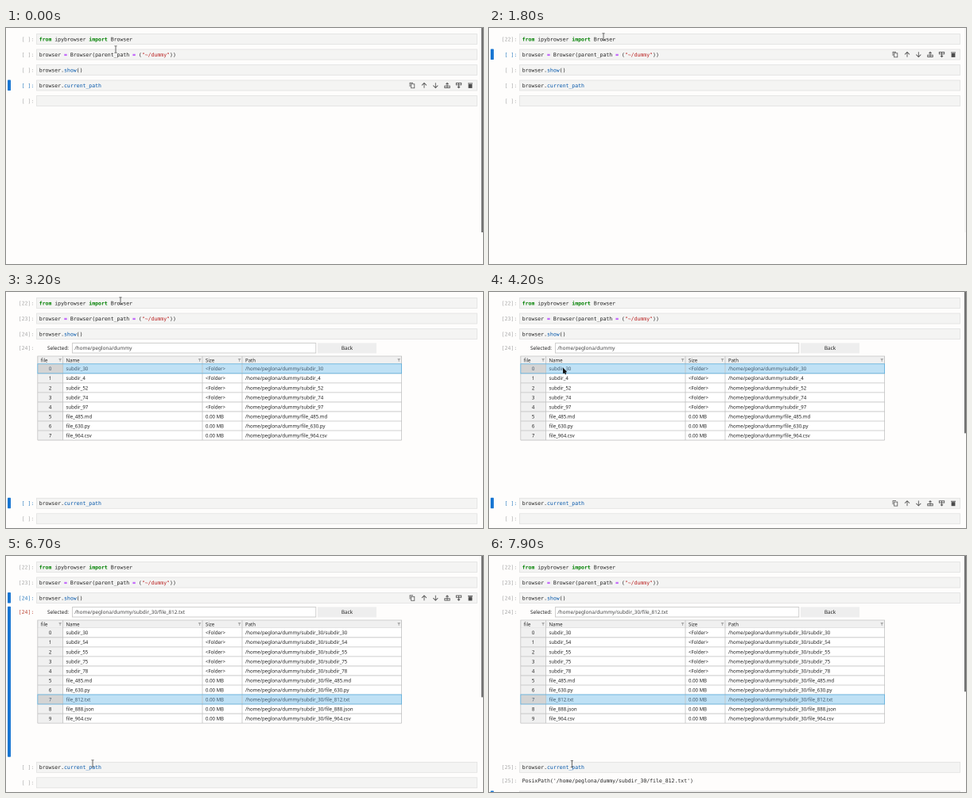
An HTML page with a canvas for the animation above (8000 ms loop, 600x298 px).

```html
<!DOCTYPE html>
<html lang="en">
<head>
<meta charset="utf-8">
<title>Notebook file browser</title>
<style>
  html, body { margin: 0; width: 100%; height: 100%; overflow: hidden; background: #fefdfc; }
  canvas { display: block; width: 600px; height: 298px; }
</style>
</head>
<body>
<canvas id="stage"></canvas>
<script>
const W = 600, H = 298, LOOP = 8000, STEP = 100;
const canvas = document.getElementById('stage');
const ctx = canvas.getContext('2d');
// Double resolution keeps the small text smooth.
const scale = 2 * (window.devicePixelRatio || 1);
canvas.width = W * scale;
canvas.height = H * scale;

const CODE_SIZE = 6.5, CHAR = CODE_SIZE * 0.602;
const MONO = { size: CODE_SIZE, family: '"DejaVu Sans Mono", monospace' };
const LABEL = { size: 6.4, family: '"Noto Sans", sans-serif' };
const SMALL = { ...LABEL, size: 6.05 };
const INK = '#212121', BLUE = '#0055aa', GREEN = '#008000', ACCENT = '#1976d2', FADED = '#a9a9a9';
const HOME = '/home/peglona/dummy', SUBDIR = `${HOME}/subdir_30`, PICK = `${SUBDIR}/file_812.txt`;

const CODE = [
  [['from', GREEN, 1], [' ipybrowser '], ['import', GREEN, 1], [' Browser']],
  [['browser '], ['=', '#aa22ff', 1], [' Browser(parent_path '], ['=', '#aa22ff', 1],
   [' ('], ['"~/dummy"', '#ba2121'], ['))']],
  [['browser.'], ['show', BLUE], ['()']],
  [['browser.'], ['current_path', BLUE]],
  []
];
const ROOT_FILES = ['subdir_30', 'subdir_4', 'subdir_52', 'subdir_74', 'subdir_97',
  'file_485.md', 'file_630.py', 'file_964.csv'];
const SUB_FILES = ['subdir_30', 'subdir_54', 'subdir_55', 'subdir_75', 'subdir_78',
  'file_485.md', 'file_630.py', 'file_812.txt', 'file_888.json', 'file_964.csv'];

// Running cell i selects the cell below it.
const RUNS = [{ at: 1500, done: 1700 }, { at: 2300, done: 2500 },
  { at: 3000, done: 3200 }, { at: 7800, done: 7900 }];
const SHOWN = RUNS[2].done, PRINTED = RUNS[3].done;
const OPEN_DIR = 4600, PICK_FILE = 6000;
const EVENTS = [
  { at: -STEP, cell: 3, wait: 0 },
  { at: 500, cell: 0, wait: 100, edit: true },
  { at: OPEN_DIR, cell: 2, wait: 100 },
  { at: 7100, cell: 3, wait: 100, edit: true },
  ...RUNS.map(({ at }, i) => ({ at, cell: i + 1, wait: 200 + (i === 2) * 200 }))
].sort((a, b) => a.at - b.at);

const MOVES = [
  { from: 0, to: 300, x: 144, y: 11 },
  { from: 3800, to: 4200, x: 93, y: 95.5 },
  { from: 4900, to: 5400, x: 112, y: 117 },
  { from: 5400, to: 5800, x: 112, y: 180.5 },
  { from: 6200, to: 6700, x: 109, y: 262 },
  { from: 6700, to: 7100, x: 104.3, y: 262.5 }
];

const clamp = v => Math.min(1, Math.max(0, v));

function pointerAt(t) {
  let x = 138, y = 27;
  for (const m of MOVES) {
    const k = clamp((t - m.from) / (m.to - m.from));
    x += (m.x - x) * k;
    y += (m.y - y) * k;
  }
  return [x, y];
}

function rowY(i, t) {
  let y = 14 + 19.5 * i;
  if (i > 2 && t >= SHOWN) y += 194.3;
  if (i > 3 && t >= PRINTED) y += 17.2;
  return y;
}

function promptOf(i, t) {
  const run = RUNS[i];
  if (!run || t < run.at) return '[ ]:';
  return t < run.done ? '[*]:' : `[${22 + i}]:`;
}

function text(str, x, y, { size, family, color = INK, bold, align = 'left' } = MONO) {
  ctx.font = `${bold ? 'bold ' : ''}${size}px ${family}`;
  ctx.fillStyle = color;
  ctx.textAlign = align;
  ctx.fillText(str, x, y + 2.3);
}

function prompt(str, y, color) {
  text(str, 35.3, y, { ...MONO, color, align: 'right' });
}

function box(x, y, w, h, fill, stroke, width = 0.7) {
  ctx.fillStyle = fill;
  ctx.fillRect(x, y, w, h);
  if (stroke) outline(x, y, w, h, stroke, width);
}

function outline(x, y, w, h, color, width) {
  ctx.strokeStyle = color;
  ctx.lineWidth = width;
  ctx.strokeRect(x, y, w, h);
}

function line(color, width, x, y, ...rest) {
  ctx.strokeStyle = color;
  ctx.lineWidth = width;
  ctx.beginPath();
  ctx.moveTo(x, y);
  for (let i = 0; i < rest.length; i += 2) ctx.lineTo(rest[i], rest[i + 1]);
  ctx.stroke();
}

function marker(y, h) {
  ctx.fillStyle = ACCENT;
  ctx.beginPath();
  ctx.roundRect(2, y, 4, h, 0.8);
  ctx.fill();
}

function cell(i, t, event) {
  const y = rowY(i, t), active = event.cell === i, editing = active && event.edit;
  if (active) marker(y - 7, 13.5);
  prompt(promptOf(i, t), y, active ? '#307fc1' : FADED);
  box(38.5, y - 6.5, 554, 13, editing ? '#fff' : '#f4f4f3', editing ? ACCENT : '#dedede');
  let x = 41.7;
  for (const [str, color, bold] of CODE[i]) {
    text(str, x, y, { ...MONO, color, bold });
    x += str.length * CHAR;
  }
  const blink = editing && t - event.at < 500;
  if (blink) {
    const caretX = 41.7 + CHAR * (i ? 17 : 26);
    line(INK, 0.7, caretX, y - 5.5, caretX, y + 5.5);
  }
}

// dir is -1 for up, 1 for down
function arrow(x, y, dir, size) {
  line('#555', 0.9, x, y - dir * 3.3, x, y + dir * 3);
  line('#555', 0.9, x - size, y + dir * (3.1 - size), x, y + dir * 3.1, x + size, y + dir * (3.1 - size));
}

function insertIcon(x, y, dir) {
  arrow(x, y, dir, 1.6);
  outline(x - 3.2, y - dir * 0.7, 6.4, -dir * 2.3, '#555', 0.9);
}

function toolbar(y) {
  line('#555', 0.8, 508, y + 1.5, 508, y - 3.2, 512, y - 3.2);
  outline(509.6, y - 1.7, 4.2, 5, '#555', 0.8);
  arrow(526, y, -1, 3);
  arrow(540.3, y, 1, 3);
  insertIcon(555, y, -1);
  insertIcon(569.5, y, 1);
  box(581.6, y - 1.6, 4.8, 5, '#4c4c4c');
  box(581, y - 3, 6, 0.9, '#4c4c4c');
}

function funnel(x) {
  ctx.fillStyle = FADED;
  ctx.beginPath();
  ctx.moveTo(x - 1.9, 84);
  ctx.lineTo(x + 1.9, 84);
  ctx.lineTo(x, 87);
  ctx.fill();
  line(FADED, 0.9, x, 86, x, 88);
}

function table(dir, files, picked) {
  const cols = [39.8, 71.5, 247, 297, 497.6], rowH = 12.03, top = 90.8;
  const left = cols[0], width = cols[4] - left, indexW = cols[1] - left;
  const height = rowH * files.length, border = '#c2c2c2';
  box(left, 81, width, top - 81, '#f0f0f0', border);
  box(left, top, width, height, '#fff');
  box(left, top, indexW, height, '#f0f0f0');
  ['file', 'Name', 'Size', 'Path'].forEach((label, i) => {
    text(label, cols[i] + 4, 86, SMALL);
    funnel(cols[i + 1] - 3.4);
  });
  files.forEach((name, i) => {
    const y = top + rowH * i, mid = y + 6.1, on = i === picked;
    const style = { ...SMALL, color: on ? '#40566a' : INK };
    if (on) {
      box(left, y, width, rowH, '#bfe1f5');
      box(left, y, indexW, rowH, '#d4d4d4');
    }
    line(border, 0.8, left, y + rowH, cols[4], y + rowH);
    text(String(i), 55.6, mid, { ...style, align: 'center' });
    [name, name.startsWith('subdir') ? '<Folder>' : '0.00 MB', `${dir}/${name}`]
      .forEach((str, c) => text(str, cols[c + 1] + 4, mid, style));
  });
  for (const x of cols) line(border, 0.8, x, 81, x, top + height);
  if (picked >= 0) outline(left, top + rowH * picked, width, rowH, '#5aaede', 0.8);
}

function browser(t, active) {
  const inSub = t >= OPEN_DIR, dir = inSub ? SUBDIR : HOME;
  if (active) marker(63.7, 190);
  prompt('[24]:', 70.5, active ? '#bf4a3a' : FADED);
  text('Selected:', 52, 70.9, LABEL);
  box(83.4, 64.6, 306.4, 12.4, '#fff', '#bdbdbd', 0.7);
  text(t >= PICK_FILE + STEP ? PICK : dir, 86.3, 70.9, { ...LABEL, color: '#444' });
  box(392, 64.4, 74, 13, '#eee');
  text('Back', 429, 70.9, { ...LABEL, align: 'center' });
  if (inSub) table(dir, SUB_FILES, t >= PICK_FILE ? 7 : -1);
  else table(dir, ROOT_FILES, 0);
}

function scrollbar(t) {
  const shift = rowY(4, t) - rowY(4, 0);
  ctx.globalAlpha = t < SHOWN ? Math.max(0.05, clamp((1800 - t) / 400)) : clamp((t - SHOWN) / 300);
  box(598.2, 0, 1.5, 258 - 0.41 * shift, '#404040');
  ctx.globalAlpha = 1;
}

function pointer(t) {
  const [x, y] = pointerAt(t);
  if (y > 60 && y < 257) {
    line('#111', 1.3, x + 1.6, y + 4, x + 3.5, y + 8.5);
    ctx.fillStyle = '#111';
    ctx.beginPath();
    ctx.moveTo(x, y);
    ctx.lineTo(x, y + 7.5);
    ctx.lineTo(x + 5.2, y + 5.5);
    ctx.fill();
    return;
  }
  line('#444', 0.8, x, y - 4, x, y + 4);
  for (const end of [-4.2, 4.2]) line('#444', 0.7, x - 1.6, y + end, x + 1.6, y + end);
}

function draw(t) {
  const event = EVENTS.filter(e => e.at <= t).pop();
  ctx.setTransform(scale, 0, 0, scale, 0, 0);
  box(0, 0, W, H, '#fefdfc');
  CODE.forEach((_, i) => cell(i, t, event));
  if (t >= SHOWN) browser(t, event.cell === 2);
  if (t >= PRINTED) {
    prompt('[25]:', 283.5, FADED);
    text(`PosixPath('${PICK}')`, 41.7, 283.5);
  }
  if (t >= event.at + event.wait) toolbar(rowY(event.cell, t));
  scrollbar(t);
  pointer(t);
}

const start = performance.now();
function tick() {
  const t = (performance.now() - start) % LOOP;
  draw(Math.floor(t / STEP) * STEP);
  requestAnimationFrame(tick);
}
tick();
</script>
</body>
</html>
```
